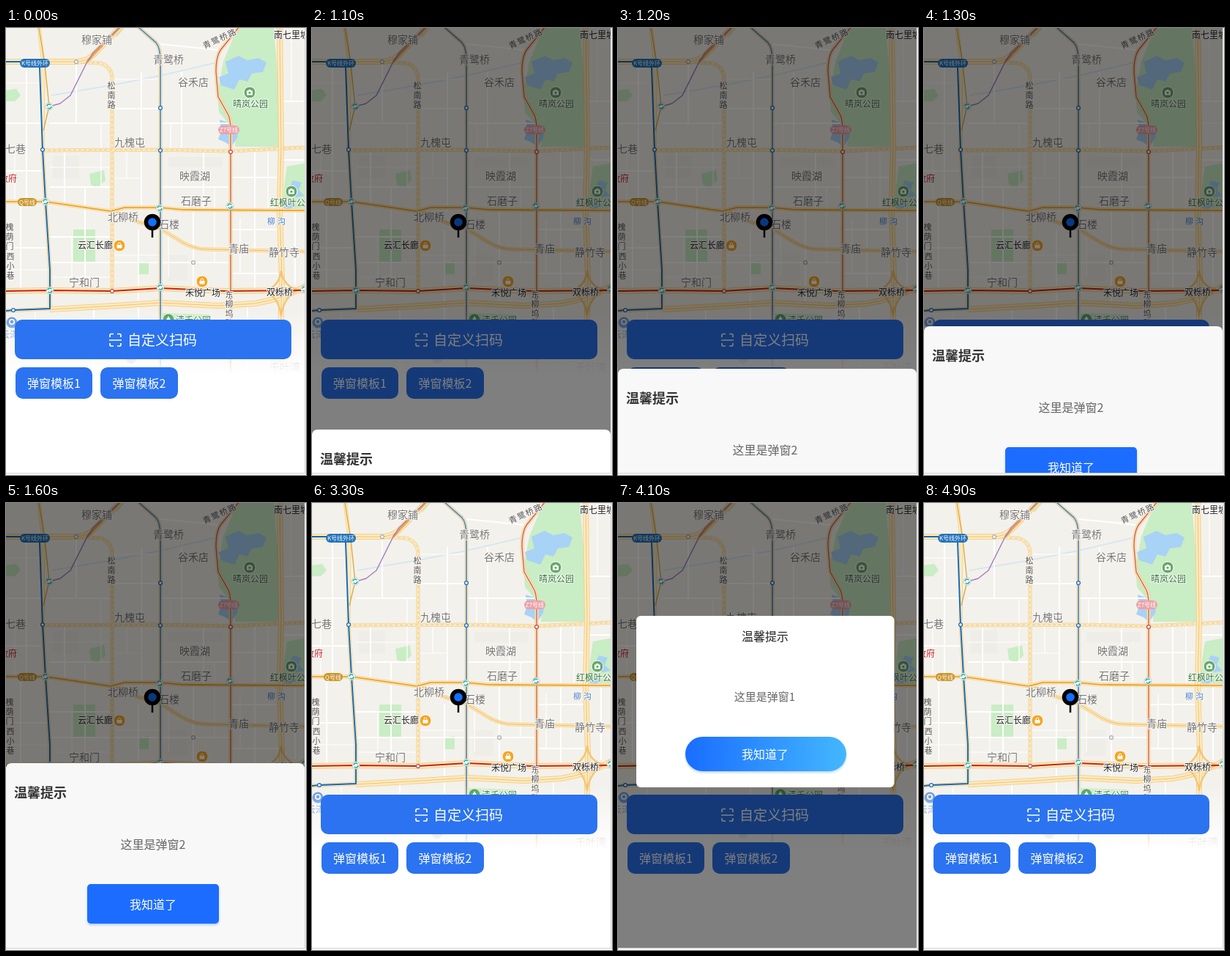
An HTML page for the animation above (5700 ms loop, 410 by 610 pixels).

```html
<!DOCTYPE html>
<html lang="zh-CN">
<head>
<meta charset="utf-8">
<title>地图弹窗</title>
<style>
html, body { margin: 0; width: 100%; height: 100%; overflow: hidden; background: #fff; }
svg { display: block; width: 410px; height: 610px; }
text { font-family: "Noto Sans CJK SC", "Noto Sans CJK", "Noto Sans", sans-serif; }
.mid { text-anchor: middle; }
.roads { fill: none; stroke-linejoin: round; }
.lane { stroke: #fff; stroke-width: 2; }
.thin { stroke: #fff; stroke-width: 1.2; }
.case { stroke: #f6cf88; stroke-width: 5; }
.fill { stroke: #fdebc0; stroke-width: 3.4; }
.wide .case { stroke-width: 8; }
.wide .fill { stroke-width: 6; }
.dash { stroke: #dcc9a8; stroke-width: 1; stroke-dasharray: 4 3; }
.area { font-size: 14px; font-weight: 500; fill: #777; }
.poi { font-size: 12px; font-weight: 500; fill: #222; }
.road { font-size: 11px; fill: #555; }
.area, .poi, .road { paint-order: stroke; stroke: #f8f6f2; stroke-width: 2px; stroke-linejoin: round; }
.green { fill: #2f7a3c; }
.badge { font-size: 8px; fill: #fff; text-anchor: middle; }
.white { fill: #fff; }
.body { fill: #666; }

.shade, .sheet, .dialog, .panel { animation: 5.7s step-end infinite; }
.shade { animation-name: shade; }
.sheet { animation-name: sheet; }
.panel { animation-name: panel; }
.dialog { animation-name: dialog; }

@keyframes shade {
  0%, 57.89% { visibility: hidden; }
  19.29%, 71.92% { visibility: visible; }
  85.96%, 100% { visibility: hidden; }
}
@keyframes sheet {
  0% { transform: translateY(260px); }
  19.29% { transform: translateY(193px); }
  21.05% { transform: translateY(110px); }
  22.8% { transform: translateY(52px); }
  24.56% { transform: translateY(18px); }
  26.31% { transform: translateY(4px); }
  28.07% { transform: none; }
  57.89%, 100% { transform: translateY(260px); }
}
@keyframes panel {
  0%, 100% { fill: #fff; }
  21.05% { fill: #f8f8f8; }
}
@keyframes dialog {
  0%, 85.96%, 100% { visibility: hidden; }
  71.92% { visibility: visible; }
}
</style>
</head>
<body>
<svg viewBox="0 0 410 610">
  <defs>
    <linearGradient id="fade" gradientUnits="userSpaceOnUse" x1="0" y1="385" x2="0" y2="474">
      <stop offset="0" stop-color="#fff" stop-opacity="0"/>
      <stop offset="1" stop-color="#fff"/>
    </linearGradient>
    <linearGradient id="blue">
      <stop offset="0" stop-color="#1a6dff"/>
      <stop offset="1" stop-color="#43b7ff"/>
    </linearGradient>
    <filter id="soft" x="-10%" y="-20%" width="120%" height="150%">
      <feDropShadow dx="0" dy="2" stdDeviation="1.5" flood-color="#1a6dff" flood-opacity=".3"/>
    </filter>
    <clipPath id="stage"><path d="M0 0H408V607H0Z"/></clipPath>
    <g id="stop">
      <circle r="5" fill="#fff" stroke="#a9b6b6" stroke-width=".7"/>
      <circle r="2.9" fill="none" stroke="#22ad9b" stroke-width="1.5" stroke-dasharray="7 2.1"/>
    </g>
    <circle id="dot" r="2.4" fill="#fff" stroke-width="1.3"/>
    <g id="camera">
      <circle r="8" fill="#69a86b" stroke="#fff"/>
      <path d="M-4-2.5h2l1-1.5h2l1 1.5h2v6h-8z" fill="#fff"/>
      <circle cy=".3" r="1.6" fill="#69a86b"/>
    </g>
    <g id="bag">
      <circle r="8" fill="#f5a623" stroke="#fff"/>
      <path d="M-3.5-1h7v4.5h-7z" fill="#fff"/>
      <path d="M-1.8-1v-1.2a1.8 1.8 0 0 1 3.6 0V-1" fill="none" stroke="#fff"/>
    </g>

    <path id="northwest" d="M0 46H94Q110 46 120 36L157-2"/>
    <path id="ringWest" d="M45-2L51 48L50 166L54 237L60 330V383L0 386"/>
    <path id="central" d="M180-2L205 20Q211 27 211 45V475"/>
    <path id="east" d="M319-2L294 29Q287 38 287 60L290 94L304 119Q307 126 307 140V475"/>
    <path id="ringEast" d="M374-2L376 160L374 250L377 340L374 475"/>
    <path id="newRoad" d="M96 46L128 48Q145 52 145 70V358"/>
    <path id="cross" d="M50 167L200 166L307 168L410 163"/>
    <path id="middle" d="M0 237H54L143 250L162 245H210L242 248L410 249"/>
    <path id="slant" d="M150 251L176 263L211 274L242 293Q258 302 278 302L410 305"/>
    <path id="avenue" d="M0 359L60 358L145 359L211 355L300 359L410 358"/>
    <path id="south" d="M60 384L150 379L211 375L290 379L340 376Q378 370 410 352"/>
  </defs>

  <g clip-path="url(#stage)">
    <!-- map ground -->
    <path d="M0 0H410V480H0Z" fill="#f3f1ec"/>
    <g fill="#c9edc4">
      <path d="M316 0H366L371 62L374 162H313L314 142L291 115L289 88L297 46Z"/>
      <path d="M384 189L410 184V246H378L380 215Z"/>
      <path d="M114 199L134 194L136 208L125 218L116 214Z"/>
      <path d="M92 275H122V319H92Z"/>
      <path d="M0 85L14 83L20 92L12 100H0Z"/>
      <path d="M148 0H162L151 13Z"/>
      <path d="M214 389L278 391V400H214Z"/>
      <path d="M181 320L195 318V336H181Z"/>
    </g>
    <g fill="#a8d2f6">
      <path d="M300 46L318 38L330 44L345 41L356 47L351 60L336 62L330 73L319 70L312 84L294 78L291 67L304 62Z"/>
      <path d="M292 125L304 129L318 137L316 150L308 162L300 156L290 152L294 140Z"/>
      <path d="M392 208L404 211L400 221L408 229L396 231L386 220Z"/>
      <path d="M378 243L392 236L396 243L384 249Z"/>
    </g>
    <path d="M62 92L145 78L211 65L288 47" fill="none" stroke="#cfe4f4" stroke-width="1.5"/>
    <path d="M64 174H100V205H64ZM222 176H296V190H222ZM220 310H248V345H220Z" fill="#efede8"/>

    <g class="roads">
      <path class="lane" d="M60 217H145M54 285H145M60 130H145M145 110H211M211 130H306M211 217H306M307 204H374M211 320H306M60 320H211M0 195H50M0 300H56M0 130H48M376 100H410M376 180H410M211 22L290 30M307 275H374M307 335H374"/>
      <path class="lane" d="M80 166V240M108 217V355M185 60V250M181 275V455M256 249V378M240 60V166M270 166V248M340 166V358M28 46V237M20 237V359M96 46V130M395 250V350M120 384V475M330 380V475"/>
      <path class="thin" d="M60 190H145M145 205H185M145 70H211M165 166V205M225 130V166M285 217V320M320 260V335M0 75H46M12 166V237M60 340H145M145 310H211M222 280V340M90 285V355M130 130V217M358 166V248M390 0V98M376 130H410M0 330H58M40 385V475"/>

      <g class="case">
        <use href="#newRoad"/><use href="#cross"/>
        <use href="#ringWest"/><use href="#central"/><use href="#east"/>
        <use href="#middle"/><use href="#slant"/>
      </g>
      <g class="fill">
        <use href="#newRoad"/><use href="#cross"/>
        <use href="#ringWest"/><use href="#central"/><use href="#east"/>
        <use href="#middle"/><use href="#slant"/>
      </g>
      <g class="dash"><use href="#newRoad"/><use href="#cross"/></g>
      <g class="wide">
        <g class="case"><use href="#northwest"/><use href="#ringEast"/><use href="#avenue"/><use href="#south"/></g>
        <g class="fill"><use href="#northwest"/><use href="#ringEast"/><use href="#avenue"/><use href="#south"/></g>
        <path d="M356 359Q374 350 376 332Q380 354 400 357Q380 366 376 392Q372 368 356 359" stroke="#f3c878" stroke-width="2.5"/>
      </g>
      <g stroke="#f0b65c" stroke-width=".8">
        <use href="#northwest"/><use href="#ringEast"/><use href="#south"/>
      </g>
      <path d="M111 46L120 36L157-2" stroke="#f0a64a" stroke-width="3"/>
      <path d="M45 0L53 50L59 107L51 140" stroke="#d9a93c" stroke-width="1.3"/>
      <path d="M157-3L119 34L111 46L88 92L74 103L60 107" stroke="#a57fc0" stroke-width="1.5"/>
      <use href="#east" stroke="#c4575c" stroke-width="1.3"/>
      <use href="#central" stroke="#4d8fd8" stroke-width="1.8"/>
      <use href="#middle" stroke="#e69a1d" stroke-width="1.7"/>
      <use href="#slant" stroke="#eeb75c"/>
      <use href="#avenue" stroke="#c8201f" stroke-width="1.8"/>
      <path d="M0 46H40Q46 46 46 54L50 166L54 237L60 330V383L10 385L0 386" stroke="#0f68c0" stroke-width="1.9"/>
    </g>

    <use href="#stop" x="59" y="107"/><use href="#stop" x="54" y="237"/>
    <use href="#stop" x="210" y="246"/><use href="#stop" x="306" y="243"/>
    <use href="#stop" x="60" y="358"/><use href="#stop" x="211" y="354"/>
    <use href="#stop" x="408" y="356"/>
    <g stroke="#1769bd">
      <use href="#dot" x="50" y="166"/><use href="#dot" x="211" y="109"/>
      <use href="#dot" x="211" y="167"/><use href="#dot" x="10" y="385"/>
    </g>
    <g stroke="#b94b4b"><use href="#dot" x="145" y="359"/><use href="#dot" x="307" y="169"/></g>
    <g stroke="#aaa"><use href="#dot" x="96" y="46"/><use href="#dot" x="256" y="320"/></g>

    <rect x="19" y="42" width="41" height="12" rx="6" fill="#2272b9"/>
    <text class="badge" x="39.5" y="51">K号线外环</text>
    <rect x="16" y="232" width="26" height="11" rx="5.5" fill="#c9962c"/>
    <text class="badge" x="29" y="240.5">Q号线</text>
    <rect x="290" y="133" width="29" height="12" rx="6" fill="#eba2a9"/>
    <text class="badge" x="304.5" y="142">Z7号线</text>

    <use href="#camera" x="333" y="88"/><use href="#camera" x="390" y="223"/>
    <use href="#bag" x="155" y="297"/><use href="#bag" x="268" y="346"/>
    <circle cx="8" cy="402" r="7.5" fill="#5a8fdc"/>
    <circle cx="8" cy="401" r="3.2" fill="none" stroke="#fff" stroke-width="1.6"/>
    <circle cx="222" cy="398" r="7.5" fill="#4b9e53"/>
    <path d="M222 393l4 7h-8z" fill="#fff"/>
    <circle cx="171" cy="451" r="7" fill="#a7b6cb"/>

    <g class="area mid">
      <text x="124" y="21">穆家铺</text><text x="222" y="48">青鹭桥</text>
      <text x="256" y="79">谷禾店</text><text x="169" y="161">九槐屯</text>
      <text x="258" y="207">映霞湖</text><text x="260" y="241">石磨子</text>
      <text x="160" y="263">北柳桥</text><text x="223" y="273">石楼</text>
      <text x="318" y="306">青庙</text><text x="380" y="311">静竹寺</text>
      <text x="107" y="352">宁和门</text><text x="13" y="170">七巷</text>
      <text x="381" y="468">千叶湾</text>
    </g>
    <g class="poi">
      <text x="366" y="14">南七里坡</text>
      <text class="mid green" x="334" y="108">晴岚公园</text>
      <text class="green" x="361" y="243">红枫叶公园</text>
      <text class="mid" x="122" y="301">云汇长廊</text>
      <text class="mid" x="269" y="366">禾悦广场</text>
      <text class="mid" x="374" y="365">双栎桥</text>
      <text x="-9" y="210" style="fill:#c8242b">政府</text>
      <text class="green" x="232" y="403">清禾公园</text>
      <text x="-7" y="423" style="fill:#4a80d0">云泽</text>
    </g>
    <g class="road mid">
      <text x="144" y="83">松<tspan x="144" dy="13">南</tspan><tspan x="144" dy="13">路</tspan></text>
      <text x="5" y="276">槐<tspan x="5" dy="13">荫</tspan><tspan x="5" dy="13">门</tspan><tspan x="6" dy="14">西</tspan><tspan x="6" dy="13">小</tspan><tspan x="6" dy="13">巷</tspan></text>
      <text x="305" y="368">东<tspan x="305" dy="13">柳</tspan><tspan x="305" dy="13">坞</tspan><tspan x="305" dy="13">路</tspan></text>
      <text transform="translate(294 18) rotate(-25)" letter-spacing="1.5">青鹭桥路</text>
      <text x="371" y="268" letter-spacing="3" style="fill:#4b83cf">柳沟</text>
    </g>
    <path d="M0 385H410V610H0Z" fill="url(#fade)"/>

    <!-- pin -->
    <path d="M200 274V286" stroke="#000" stroke-width="2.5"/>
    <circle cx="200" cy="265" r="11.3"/>
    <circle cx="200" cy="265" r="5.8" fill="#1270ff"/>

    <!-- page buttons -->
    <g fill="#2b73f0">
      <rect x="12" y="398" width="378" height="54" rx="10"/>
      <rect x="13" y="463" width="105" height="43" rx="10"/>
      <rect x="129" y="463" width="106" height="43" rx="10"/>
    </g>
    <path d="M142 422v-2.5a2 2 0 0 1 2-2h3M152 417.5h3a2 2 0 0 1 2 2v2.5M157 430v2a2 2 0 0 1-2 2h-3M147 434h-3a2 2 0 0 1-2-2v-2M141 426h17" fill="none" stroke="#fff" stroke-width="1.7"/>
    <g class="white">
      <text x="166" y="433" font-size="19">自定义扫码</text>
      <g class="mid" font-size="16">
        <text x="65.5" y="491">弹窗模板1</text>
        <text x="182" y="491">弹窗模板2</text>
      </g>
    </g>

    <path class="shade" d="M0 0H408V607H0Z" fill-opacity=".5"/>

    <g class="sheet">
      <path class="panel" d="M0 363Q0 355 8 355H400Q408 355 408 363V610H0Z"/>
      <text x="11" y="402" font-size="18" font-weight="700" fill="#333">温馨提示</text>
      <text class="mid body" x="201" y="472" font-size="16">这里是弹窗2</text>
      <rect x="111" y="520" width="180" height="54" rx="5" fill="#1a6dff" filter="url(#soft)"/>
      <text class="mid white" x="201" y="554" font-size="16">我知道了</text>
    </g>

    <g class="dialog">
      <rect x="25" y="154" width="352.5" height="234" rx="6" fill="#fff"/>
      <text class="mid" x="201" y="188" font-size="16" fill="#222">温馨提示</text>
      <text class="mid body" x="200.5" y="270" font-size="15">这里是弹窗1</text>
      <rect x="92" y="319" width="220" height="47" rx="23.5" fill="url(#blue)" filter="url(#soft)"/>
      <text class="mid white" x="201" y="349" font-size="16" font-weight="500">我知道了</text>
    </g>
  </g>

  <path d="M408.5 0V607.5H0" fill="none" stroke="#d9d9d9"/>
  <path d="M409.5 0V608.5H0" fill="none" stroke="#eee"/>
</svg>
</body>
</html>
```
